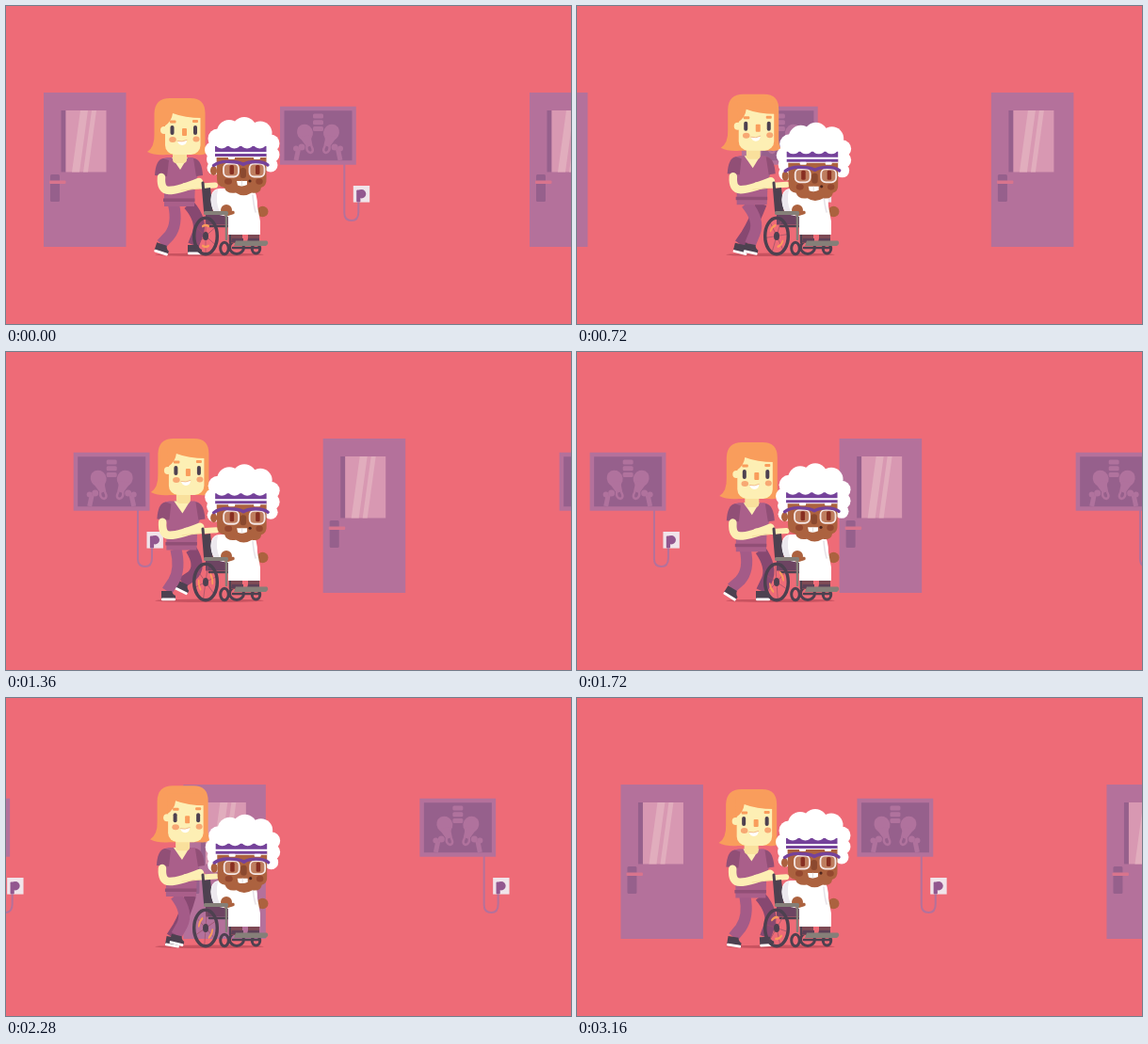
These frames come from a looping animation (600 by 338 pixels, 3200 ms). An HTML page with a canvas:

```html
<!DOCTYPE html>
<html lang="en">
<head>
<meta charset="utf-8">
<title>Ward walk</title>
<style>
html, body { margin: 0; width: 100%; height: 100%; overflow: hidden; background: #ee6b77; }
canvas { display: block; width: 600px; height: 338px; }
</style>
</head>
<body>
<canvas id="stage" width="600" height="338"></canvas>
<script>
const ctx = document.getElementById('stage').getContext('2d');
const LOOP = 3200, STRIDE = 1600, TURN = 800, SPAN = 516, STEP = 40;
const TAU = Math.PI * 2;

const C = {
  wall: '#ee6b77', shadow: '#c8525f', door: '#b4719b', deep: '#96608c',
  hair: '#f99d5c', skin: '#fdefb4', blush: '#f7a873', scrub: '#aa5f8a',
  sleeve: '#914f76', near: '#a45b88', far: '#874871', dark: '#4d4150',
  white: '#ffffff', brown: '#ac623f', brownDark: '#8b492f',
  violet: '#75429a', grey: '#857f78'
};

// Key times (ms within one stride) and values, joined by a smooth closed curve
const lift = [[0, 0], [120, 2], [400, 5.6], [680, 4.8], [720, 4.2], [850, 3], [1000, 4], [1360, 6], [1560, 1]];
const nearFoot = [[0, 165, 256, 18], [120, 164, 254, 32], [300, 164, 248, 52], [500, 171, 247, 38],
  [680, 181, 255, 14], [720, 184, 256, 12], [850, 189, 257, 0], [1000, 183, 257, 0],
  [1360, 171, 257, 0], [1560, 166, 257, 9]];
const farFoot = [[0, 199, 257, 0], [120, 196, 257, 0], [680, 176, 257, 10], [720, 173, 256, 14],
  [1000, 170, 248, 52], [1200, 175, 245, 45], [1360, 187, 248, 26], [1500, 201, 255, -8], [1560, 200, 257, -3]];

function sample(keys, t, k) {
  const n = keys.length;
  const at = i => {
    const turn = Math.floor(i / n), key = keys[i - turn * n];
    return [key[0] + turn * STRIDE, key[k]];
  };
  let i = n - 1;
  while (i > 0 && keys[i][0] > t) i--;
  const a = at(i - 1), b = at(i), c = at(i + 1), d = at(i + 2);
  const w = c[0] - b[0], u = (t - b[0]) / w;
  const m = (c[1] - a[1]) / (c[0] - a[0]) * w, q = (d[1] - b[1]) / (d[0] - b[0]) * w;
  const u2 = u * u, u3 = u2 * u;
  return (2 * u3 - 3 * u2 + 1) * b[1] + (u3 - 2 * u2 + u) * m + (3 * u2 - 2 * u3) * c[1] + (u3 - u2) * q;
}

function rect(x, y, w, h, color, r = 0) {
  ctx.fillStyle = color;
  ctx.beginPath();
  ctx.roundRect(x, y, w, h, r);
  ctx.fill();
}
function oval(x, y, rx, ry, color, rot = 0) {
  ctx.fillStyle = color;
  ctx.beginPath();
  ctx.ellipse(x, y, rx, ry, rot, 0, TAU);
  ctx.fill();
}
const dot = (x, y, r, color) => oval(x, y, r, r, color);
function shape(d, color) {
  ctx.fillStyle = color;
  ctx.fill(new Path2D(d));
}
function line(d, color, width, cap = 'round') {
  ctx.strokeStyle = color;
  ctx.lineWidth = width;
  ctx.lineCap = cap;
  ctx.lineJoin = 'round';
  ctx.stroke(new Path2D(d));
}
function shifted(x, y, draw) {
  ctx.save();
  ctx.translate(x, y);
  draw();
  ctx.restore();
}

function door() {
  rect(0, 92, 87.5, 164, C.door);
  rect(18.5, 111, 5, 65.5, C.deep);
  rect(23.5, 111, 43, 65.5, '#d898b2');
  shape('M39 111H47L38 176.5H30Z M51 111H56L47 176.5H42Z', '#e1adbd');
  rect(7, 179, 10, 29, C.deep, 1.5);
  rect(6, 185.5, 17.5, 3.5, '#d8748d', 1);
}

function xray() {
  const bone = '#b0729d';
  rect(251, 106.7, 80.8, 62, C.door);
  rect(255.5, 111.3, 72, 53, C.deep);
  shifted(291.5, 0, () => {
    for (let i = 0; i < 3; i++) rect(-5.5, 114.5 + i * 6.7, 11, 5, bone, 1.5);
    for (const side of [1, -1]) {
      ctx.save();
      ctx.scale(side, 1);
      oval(14, 134.5, 8.3, 9, bone, .5);
      shape('M20 139Q15 146 12 150L6 148Q8 142 7 137Z', bone);
      line('M7 149Q4 155 8 156Q13 155 12 149', bone, 2.5);
      dot(17.5, 150, 3.5, bone);
      line('M21 152L23.5 164', bone, 5, 'butt');
      dot(23.5, 151.5, 3, bone);
      ctx.restore();
    }
  });
  line('M319.3 168.5V220Q319.3 228 327 228Q334.3 228 334.3 219V207', C.door, 2);
  rect(328.8, 191, 17.4, 17.6, '#f0e4ea');
  dot(337.6, 199.8, 4.7, '#92578f');
  rect(332.2, 195.5, 4.2, 13, '#92578f', 1);
}

function leg(hx, hy, keys, t, color) {
  const x = sample(keys, t, 1), y = sample(keys, t, 2), tilt = sample(keys, t, 3) * Math.PI / 180;
  const ay = y - 3, dx = x - hx, dy = ay - hy, len = Math.hypot(dx, dy);
  const bend = Math.sqrt(Math.max(0, 24.5 * 24.5 - len * len / 4));
  const kx = (hx + x) / 2 + dy / len * bend, ky = (hy + ay) / 2 - dx / len * bend;
  line(`M${hx} ${hy}Q${kx + 1} ${ky - 3} ${(kx + x) / 2} ${(ky + ay) / 2}L${x} ${ay}`, color, 12, 'butt');
  ctx.save();
  ctx.translate(x, y);
  ctx.rotate(tilt);
  shape('M-6 -3H5Q6 1 9 2V5H-6Z', C.dark);
  rect(-6, 4.5, 15, 2.8, C.white, 1);
  ctx.restore();
}

function nurseHead() {
  shape('M150 155Q158 150 157.5 136V114Q158 98 174 98H196Q211.5 98 211.5 114V147Q212 154 214 156Q209 159 203 158H170Q158 159 150 155Z', C.hair);
  rect(177, 148, 15, 19, '#f9e09c', 4);
  rect(169, 109, 37.5, 49, C.skin, 10);
  dot(168, 132, 4, C.skin);
  shape('M168 128Q176 123 177 114Q190 119 208 119V106H168Z', C.hair);
  rect(174, 121.5, 6.5, 3, C.hair, 1);
  rect(198, 121, 6, 3, C.hair, 1);
  rect(174.5, 127, 4, 10, C.dark, 2);
  rect(199, 127, 4, 10, C.dark, 2);
  rect(187, 130, 5, 8, C.hair, 1);
  oval(177, 142, 3.8, 3, C.blush);
  oval(202, 141.5, 3.5, 3, C.blush);
  shape('M182 143.5Q187 145 192 142.5Q192 147.5 187 148Q183 147.5 182 143.5Z', C.white);
  line('M182 143.5Q187 145 192 142.5', '#f0b181', .8);
}

function nurse(t) {
  const up = sample(lift, t, 1);
  const hip = 211 - up * .25, side = up * .4;
  leg(194 + side, hip, farFoot, t, C.far);
  leg(178 + side, hip, nearFoot, t, C.near);
  shifted(up * .4, -up * .4, () => {
    shape('M171 161H198Q207 163 207 172L201 187L200 213H168L168 184L161 172Q162 162 171 161Z', C.scrub);
    shape('M167 162Q159 163 158 180L171 181L173 164Z', C.sleeve);
    shape('M199 162Q208 163 209 180L202 181Z', C.sleeve);
    shape('M176 161H193L185 174Z', C.skin);
    rect(167, 204.5, 33.5, 3.5, C.sleeve);
  });
  shifted(up * .65, -up, nurseHead);
  shifted(up * .2, -up * .2, () => {
    line('M165 182Q164 196 173 196Q183 196 205 187', C.skin, 8.5);
    line('M190 191L207 191.5L222 190.5', C.skin, 6);
    line('M186 196L205 194', '#f6dfa0', 1);
  });
}

function ring(x, y, rx, ry, width) {
  ctx.strokeStyle = C.dark;
  ctx.lineWidth = width;
  ctx.beginPath();
  ctx.ellipse(x, y, rx, ry, 0, 0, TAU);
  ctx.stroke();
}

function bigWheel(t) {
  ctx.save();
  ctx.translate(212, 244.5);
  ctx.scale(.64, 1);
  ctx.rotate(t / TURN * TAU);
  for (let i = 0; i < 6; i++) {
    ctx.rotate(TAU / 6);
    line('M0 0V-18', '#9a5267', .8);
  }
  ctx.strokeStyle = C.hair;
  ctx.lineWidth = 2.5;
  for (const a of [-Math.PI / 2, Math.PI / 2]) {
    ctx.beginPath();
    ctx.arc(0, 0, 11.5, a - .45, a + .45);
    ctx.stroke();
  }
  ctx.restore();
  ring(212, 244.5, 12.3, 19.3, 3.5);
  oval(212, 244.5, 3, 4.6, C.dark);
}

function chairBack() {
  line('M209 188L211.5 218', C.dark, 3);
  shape('M210 194L217 193L220 220H212Z', C.dark);
  rect(212, 221, 24, 11.5, '#6d4462');
  line('M216 234H240L246 250', C.dark, 2.5);
  ring(245, 256.5, 7.5, 7, 3);
  line('M238 243V251', C.dark, 2.5);
}

function chairFront(t) {
  rect(210, 218, 26, 4, C.grey, 1.5);
  line('M234 221V248', C.grey, 2.5);
  bigWheel(t);
  ring(232, 257.5, 4.3, 6.3, 3);
  ring(265.5, 258, 4.2, 5, 3);
  line('M241 257H268', C.dark, 2.5);
  shape('M244 249.5H277Q280 252 276 255H242Z', C.grey);
}

function ladyBody() {
  rect(239, 240, 12, 12, '#7d4a55');
  rect(257, 240, 12, 12, '#7d4a55');
  shape('M240 247H252V251H239Z M257 247H269V251H256Z', '#5d4057');
  oval(272.5, 218.5, 6, 5.7, C.brown);
  shape('M227 194H262Q267 199 267 213L270 229V243H236V224L222 221Q216 211 218 201Q220 194 227 194Z', C.white);
  shape('M225 195Q218 196 217.5 206Q218 215 222 220L227 219Q222 208 225 195Z', '#ece8ee');
  line('M262 201Q263 212 265 219', '#e5e0e6', 1.5);
  oval(234, 217, 6, 6, C.brown);
  line('M236 221L241 219.5', C.brown, 3.5);
}

function ladyHead() {
  const curls = [[253, 131, 13], [237, 134, 13], [270, 135, 12.5], [225, 141, 10.5], [281, 146, 9.5],
    [220, 153, 9], [282, 158, 8.5], [221, 163, 8], [281, 169, 7.5], [221, 172, 7.5]];
  for (const [x, y, r] of curls) dot(x, y, r, C.white);
  oval(251, 151, 31, 20, C.white);
  oval(220.5, 175, 3.5, 5, C.brown);
  shape('M223.5 157H276.5V184Q277 191 271 193Q270 200 261 198.5Q252 204 244 198.5Q234 200 232 193Q224 192 224 184Z', C.brown);
  rect(222, 148, 54.5, 13, C.white);
  rect(222, 149, 54.5, 6, C.violet);
  rect(222, 157, 54.5, 3, C.violet);
  for (let x = 229; x < 276; x += 13.5) oval(x, 146.5, 6.5, 5, C.white);
  rect(236, 160, 7, 3, C.white, 1);
  rect(263, 160, 7, 3, C.white, 1);
  oval(236, 186.5, 4, 3.3, '#94482f');
  oval(269, 186.5, 3.7, 3.3, '#94482f');
  rect(248.5, 172, 6.5, 11, C.brownDark, 3);
  for (const x of [231, 258.5]) {
    rect(x, 167.5, 16, 14, 'rgba(255,225,205,.22)', 5);
    rect(x + 6.5, 169, 4.5, 10, '#872f22', 1.5);
    ctx.strokeStyle = '#f5e7e5';
    ctx.lineWidth = 1.8;
    ctx.beginPath();
    ctx.roundRect(x, 167.5, 16, 14, 5);
    ctx.stroke();
  }
  line('M220.5 169.5Q227 164.5 238 165.5Q247 165.5 252 168.5Q257 165.5 265 165.5Q274 165.5 278 169', C.violet, 3.4);
  shape('M245 186H256V190Q251 192.5 246 190.5Z', C.white);
  line('M250.5 186V191', '#d9cfca', .7);
  dot(259, 186, 1.6, '#4d241d');
}

function draw(ms) {
  const t = Math.floor((ms % LOOP) / STEP) * STEP;
  const walk = t % STRIDE;
  rect(0, 0, 600, 338, C.wall);
  const x = 40 - SPAN * t / LOOP;
  for (let i = -1; i < 3; i++) {
    shifted(x + i * SPAN, 0, () => { door(); xray(); });
  }
  oval(216, 264.3, 57.5, 1.8, C.shadow);
  nurse(walk);
  chairBack();
  ladyBody();
  chairFront(t);
  const sink = 3 - 3 * Math.cos(walk / STRIDE * TAU);
  shifted(sink * .12, sink, ladyHead);
}

function frame() {
  draw(performance.now());
  requestAnimationFrame(frame);
}
draw(0);
requestAnimationFrame(frame);
</script>
</body>
</html>
```
